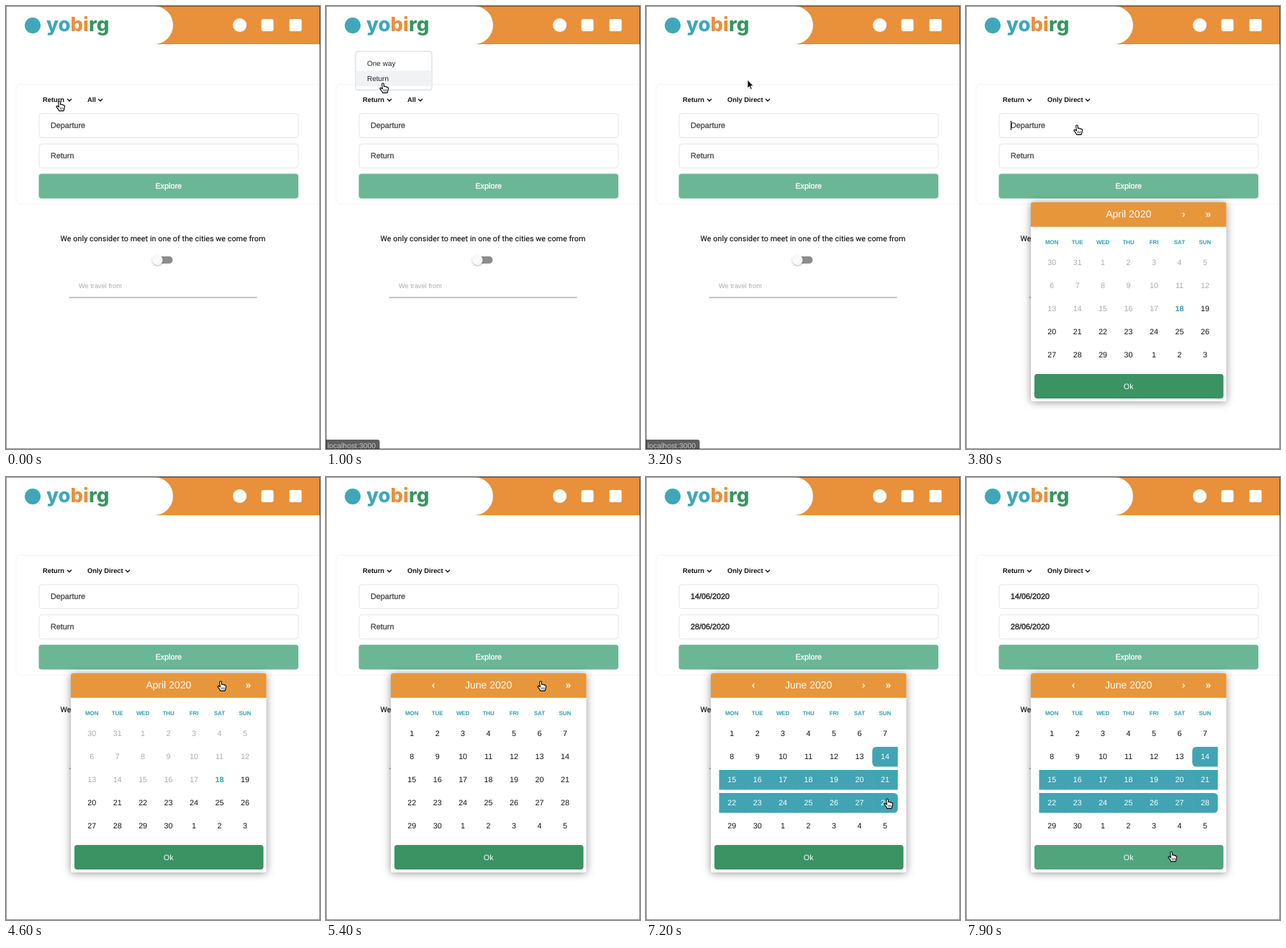
Write an HTML page that moves like this. It is 436 by 614 pixels and loops after 8000 ms.

```html
<!DOCTYPE html>
<html lang="en">
<head>
<meta charset="utf-8">
<title>Travel date picker</title>
<style>
html, body { margin: 0; width: 100%; height: 100%; overflow: hidden; background: #fff; }
svg { display: block; width: 436px; height: 614px; font-family: "Liberation Sans", Arial, sans-serif; text-rendering: geometricPrecision; }
.logo { font: 800 27.5px Inter, sans-serif; }
.body { font: 10.64px Roboto, sans-serif; letter-spacing: .00938em; stroke: #111; stroke-width: .15; }
.field { font-size: 10.8px; stroke-width: .3; }
.popup { filter: drop-shadow(0 1px 6px rgba(0,0,0,.42)); }
.thumb { filter: drop-shadow(0 1px 1px rgba(0,0,0,.3)); }
</style>
</head>
<body>
<svg viewBox="0 0 436 614">
  <rect width="436" height="614" fill="#fff"/>
  <rect width="436" height="53" fill="#e8903a"/>
  <path d="M0 0H205.5A26.5 26.5 0 0 1 205.5 53H0Z" fill="#fff"/>
  <circle cx="37" cy="27" r="11" fill="#3fa7b7"/>
  <text class="logo" x="56" y="34.5"><tspan fill="#3fa7b7">yo</tspan><tspan fill="#e8903a">bi</tspan><tspan fill="#3c9263">rg</tspan></text>
  <g fill="#fff">
    <circle cx="324.5" cy="26.5" r="9.5"/>
    <rect x="354.5" y="18" width="17" height="17" rx="3"/>
    <rect x="393.5" y="18" width="17" height="17" rx="2"/>
  </g>
  <rect x="14" y="108.5" width="430" height="166" rx="6" fill="none" stroke="#f5f5f5"/>
  <g fill="#fff" stroke="#e2e4ea">
    <rect x="46" y="149" width="360" height="33.5" rx="4"/>
    <rect x="46" y="191" width="360" height="33.5" rx="4"/>
  </g>
  <rect x="45.5" y="232.5" width="360.5" height="34.2" rx="4" fill="#6bb695"/>
  <text class="field" x="225.7" y="253.2" text-anchor="middle" fill="#fff" stroke="#fff">Explore</text>
  <text class="body" x="75.5" y="325.5" fill="#111">We only consider to meet in one of the cities we come from</text>
  <rect x="206" y="347" width="25.5" height="10" rx="5" fill="#8c8c8c"/>
  <circle class="thumb" cx="210.4" cy="352" r="7.2" fill="#fafafa"/>
  <text x="101" y="391.4" font-size="9.25" fill="#aaa">We travel from</text>
  <path d="M87.5 404H348.5" stroke="#8a8a8a"/>
  <g id="live"></g>
  <rect x=".5" y=".5" width="435" height="613" fill="none" stroke="#000" stroke-opacity=".44"/>
  <g id="cursor"></g>
</svg>
<script>
const LOOP = 8000;
const TEAL = '#42a3b3';
const live = document.getElementById('live');
const cursor = document.getElementById('cursor');

// Pointer tip: time, x, y
const PATH = [
  [0, 74, 132], [850, 74, 131], [1000, 79, 107], [1300, 85, 82], [1600, 86, 93.5], [1850, 86, 93.5],
  [2150, 133, 126], [2650, 133, 126], [2950, 141, 102.5], [3250, 141, 102.5], [3500, 154, 165],
  [3950, 154, 165], [4550, 298, 283], [5550, 298, 283], [6250, 338, 382], [6550, 338, 382],
  [6900, 335, 446], [7200, 335, 446], [7800, 285, 519.5], [LOOP, 285, 519.5]
];
const ARROW = 'M0 0V11.4L2.6 9L4.4 13L6.2 12.2L4.5 8.3H8.2Z';
const HAND = 'M-1.3 1.2Q-1.2 0 0 0Q1.2 0 1.3 1.2L1.6 4.6Q3 3.8 3.8 5Q5.2 4.4 5.8 5.7Q7.6 5.3 7.6 7.2L7 10.3L6 13.4H-.2L-1.8 10.6L-4 7.8Q-4.3 6.3-2.6 6.5L-.6 8Z';

const between = (t, a, b) => t >= a && t < b;
const ease = p => p * p * (3 - 2 * p);

function pointerAt(t) {
  const i = PATH.findIndex(k => k[0] > t);
  const [t0, x0, y0] = PATH[i - 1], [t1, x1, y1] = PATH[i];
  const p = ease((t - t0) / (t1 - t0));
  return { x: x0 + (x1 - x0) * p, y: y0 + (y1 - y0) * p };
}

const text = (x, y, size, fill, value, extra = '') =>
  `<text x="${x}" y="${y}" font-size="${size}" fill="${fill}" ${extra}>${value}</text>`;
const centered = (x, y, size, fill, value, extra = '') =>
  text(x, y, size, fill, value, 'text-anchor="middle" ' + extra);
const box = (x, y, w, h, fill, extra = '') =>
  `<rect x="${x}" y="${y}" width="${w}" height="${h}" fill="${fill}" ${extra}/>`;

const toggle = (x, label, arrowX) =>
  text(x, 133.3, 9.3, '#111', label, 'font-weight="700"') +
  `<path d="M${arrowX - 3} 128.8l3 3l3-3" fill="none" stroke="#111" stroke-width="1.4"/>`;

const field = (y, label, fill) =>
  text(62, y, 10.8, fill, label, `class="field" stroke="${fill}"`);

function menu(x, items, pointer) {
  const rows = items.map((label, i) => {
    const y = 68.5 + i * 21.2;
    const hover = between(pointer.y, y, y + 21.2);
    return (hover ? box(x + .5, y, 105, 21.2, '#f1f2f4') : '') + text(x + 16, y + 14.2, 10, '#212529', label);
  });
  return box(x, 63, 106, 53.5, '#fff', 'rx="3" stroke="#d5d5d5"') + rows.join('');
}

// Tiles inside a range overlap a little so that no seam shows.
function tilePath(x, y, roundLeft, roundRight, overlap) {
  const l = roundLeft ? 6 : 0, r = roundRight ? 6 : 0, w = 35.5 + overlap, h = 27.5;
  return `M${x + l} ${y}H${x + w - r}q${r} 0 ${r} ${r}V${y + h - r}q0 ${r} ${-r} ${r}` +
    `H${x + l}q${-l} 0 ${-l} ${-l}V${y + l}q0 ${-l} ${l} ${-l}Z`;
}

function calendar(t, pointer) {
  const month = t < 4900 ? 3 : t < 5300 ? 4 : 5;
  const name = ['April', 'May', 'June'][month - 3];
  const offset = (new Date(2020, month, 1).getDay() + 6) % 7;
  const hovered = Math.floor((pointer.y - 339.5) / 32) * 7 + Math.floor((pointer.x - 101.5) / 35.45);
  const first = 13;
  const last = t >= 7100 ? 27 : first;
  const picked = t >= 6550;
  const choosing = picked && t < 7100;

  let out = `<g class="popup">${box(90, 272, 271.5, 276, '#fff', 'rx="3"')}</g>` +
    '<path d="M90 306V275q0-3 3-3H358.5q3 0 3 3V306Z" fill="#e8963c"/>' +
    centered(225.7, 293, 14, '#fff', name + ' 2020') +
    centered(302, 293, 14, '#fff', '›', 'font-weight="700"') +
    centered(336.5, 293, 14, '#fff', '»', 'font-weight="700"');
  if (month > 3) out += centered(149, 293, 14, '#fff', '‹', 'font-weight="700"');

  ['MON', 'TUE', 'WED', 'THU', 'FRI', 'SAT', 'SUN'].forEach((day, i) => {
    out += centered(119.2 + i * 35.45, 330, 7.9, '#2f9fae', day, 'font-weight="700"');
  });

  let tiles = '', labels = '';
  for (let i = 0; i < 35; i++) {
    const x = 101.5 + i % 7 * 35.45, y = 374 + (Math.floor(i / 7) - 1) * 32;
    const date = new Date(2020, month, 1 - offset + i);
    const past = date < new Date(2020, 3, 18);
    const today = date.getMonth() === 3 && date.getDate() === 18;
    const active = picked && i >= first && i <= last;
    const inside = choosing && i > first && i <= hovered;
    const tileFill = active ? TEAL : !past && (i === hovered || inside) ? '#e0e0e0' : '';
    if (tileFill) {
      const path = tilePath(x, y, active && i === first, active && i === last, i % 7 < 6 && i !== last ? .6 : 0);
      tiles += `<path d="${path}" fill="${tileFill}"/>`;
    }
    const fill = active ? '#fff' : today ? '#2f9fae' : past ? '#aaa' : '#111';
    labels += centered(x + 17.7, y + 17, 10.7, fill, date.getDate(), today ? 'font-weight="700"' : '');
  }

  const okHover = between(pointer.y, 510, 544) && between(pointer.x, 95, 357);
  return out + tiles + labels +
    box(95, 510, 262.5, 34, okHover ? '#50a57c' : '#3b9262', 'rx="4"') +
    centered(225.7, 530.7, 10.75, '#fff', 'Ok');
}

function draw(t) {
  const pointer = pointerAt(t);
  const direct = t >= 3200;
  const chosen = t >= 7100;
  const ink = chosen ? '#111' : '#444';

  let out = toggle(51, 'Return', 88) +
    (direct ? toggle(113, 'Only Direct', 169) : toggle(113, 'All', 131)) +
    field(169.4, chosen ? '14/06/2020' : 'Departure', ink) +
    field(211.4, chosen ? '28/06/2020' : 'Return', ink);
  if (between(t, 3700, 4200)) out += box(62, 159, 1, 13, '#111');
  if (between(t, 200, 1700)) out += menu(41, ['One way', 'Return'], pointer);
  if (between(t, 2200, 3200)) out += menu(103, ['All', 'Only Direct'], pointer);
  if (t >= 3700) out += calendar(t, pointer);
  if (between(t, 1000, 2000) || between(t, 3100, 3400)) {
    out += '<path d="M0 614V601H71.5q3 0 3 3V614Z" fill="#5e5e5e"/>' +
      text(2, 612.8, 10.4, '#c4c4c4', 'localhost:3000');
  }
  live.innerHTML = out;

  const arrow = between(t, 1700, 2080) || between(t, 3200, 3420);
  const place = `transform="translate(${pointer.x} ${pointer.y})"`;
  cursor.innerHTML = `<g ${place} stroke-linejoin="round">` + (arrow
    ? `<path d="${ARROW}" fill="#000" stroke="#fff" stroke-width=".8"/>`
    : `<path d="${HAND}" fill="#fff" stroke="#000" stroke-width="1.1"/>` +
      '<path d="M1.2 8.5v3M3.1 8.5v3M5 8.5v3" stroke="#000" stroke-width=".7"/>') + '</g>';
}

const start = performance.now();
function tick() {
  draw((performance.now() - start) % LOOP);
  requestAnimationFrame(tick);
}
tick();
</script>
</body>
</html>
```
